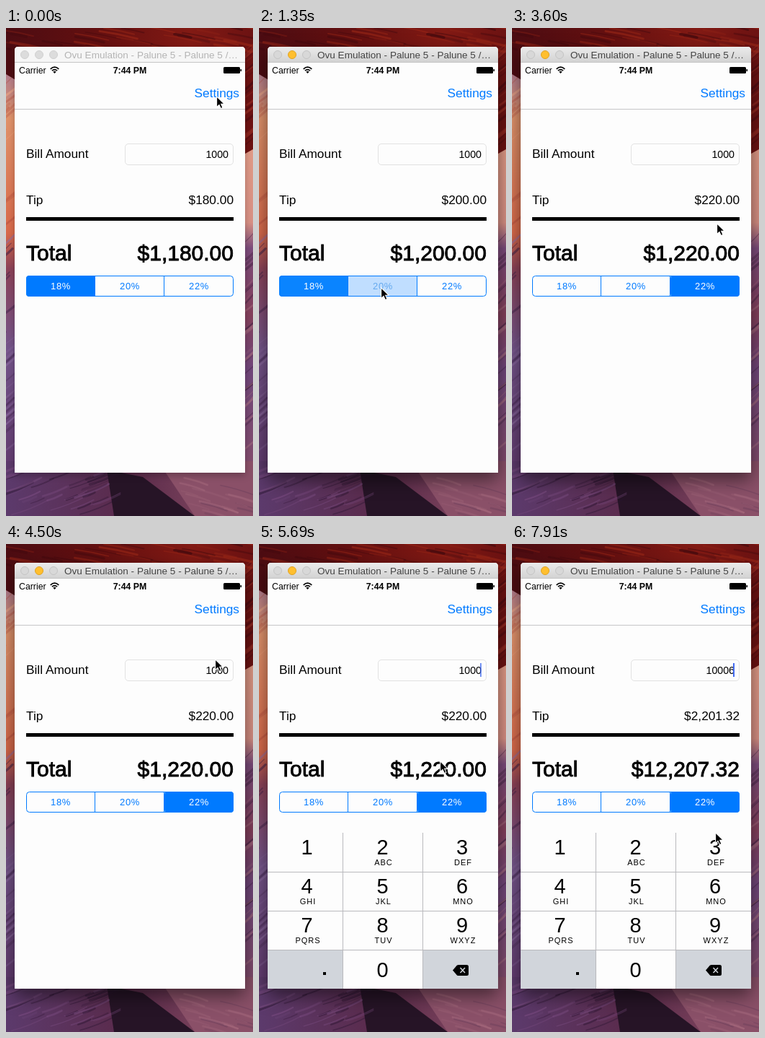
Recreate the animation shown at these times as an HTML page. Size 343 px wide and 676 px high, loop 8 s.

```html
<!DOCTYPE html>
<html lang="en">
<head>
<meta charset="utf-8">
<title>Tip calculator</title>
<style>
  html, body { margin: 0; width: 100%; height: 100%; overflow: hidden; }
  svg { display: block; width: 343px; height: 676px; font: 17.3px "Liberation Sans", Arial, sans-serif; }
  .end { text-anchor: end; }
  .mid { text-anchor: middle; }
  .blue { fill: #007aff; }
  .big { font-size: 30px; stroke: #000; stroke-width: .9px; }
  .small { font-size: 12.3px; }
  .segment { font-size: 13px; letter-spacing: .6px; }
  .digit { font-size: 29px; }
  .letters { font-size: 11px; letter-spacing: 1px; }
  #frame { filter: drop-shadow(0 4px 5px rgba(0, 0, 0, .25)); }
  .active #frame { filter: drop-shadow(0 10px 12px rgba(0, 0, 0, .5)); }
  #bar { fill: #f6f6f6; }
  .active #bar { fill: url(#barFill); }
  #title { font-size: 13.55px; fill: #b4b4b4; }
  .active #title { fill: #444; }
  .light { fill: #dcdcdc; stroke: #d0d0d0; }
  .active .light { fill: #d8d8d8; stroke: #c4c4c4; }
  .active .yellow { fill: #ffbf2f; stroke: #e0a323; }
</style>
</head>
<body>
<svg id="stage" viewBox="0 0 343 676">
  <defs>
    <linearGradient id="barFill" x2="0" y2="1">
      <stop stop-color="#ebebeb"/><stop offset="1" stop-color="#d3d3d3"/>
    </linearGradient>
    <linearGradient id="sky">
      <stop stop-color="#4c0c12"/><stop offset=".4" stop-color="#651010"/>
      <stop offset=".75" stop-color="#821a14"/><stop offset="1" stop-color="#6c1212"/>
    </linearGradient>
    <linearGradient id="leftRock" x2="0" y2="1">
      <stop stop-color="#b27c8c"/><stop offset=".1" stop-color="#e0926a"/>
      <stop offset=".36" stop-color="#d8694a"/><stop offset=".44" stop-color="#8c4258"/>
      <stop offset=".62" stop-color="#74548a"/><stop offset="1" stop-color="#5a3164"/>
    </linearGradient>
    <linearGradient id="rightRock" x2="0" y2="1">
      <stop stop-color="#e09a86"/><stop offset=".2" stop-color="#d89084"/>
      <stop offset=".27" stop-color="#7c4c7c"/><stop offset=".45" stop-color="#84405c"/>
      <stop offset=".6" stop-color="#70467a"/><stop offset="1" stop-color="#8c5066"/>
    </linearGradient>
    <linearGradient id="ground">
      <stop stop-color="#5c3a6c"/><stop offset=".5" stop-color="#5a2a4a"/>
      <stop offset="1" stop-color="#8c5066"/>
    </linearGradient>
    <clipPath id="screen"><path d="M12 48H332V616H12Z"/></clipPath>
  </defs>

  <rect width="343" height="676" fill="url(#sky)"/>
  <path d="M0 64L40 88V676H0Z" fill="url(#leftRock)"/>
  <path d="M300 192L343 168V676H300Z" fill="url(#rightRock)"/>
  <path d="M0 600H343V676H0Z" fill="url(#ground)"/>
  <path d="M215 606L343 600V676H262Z" fill="#8a5068"/>
  <path d="M140 612L190 622L262 676H150Z" fill="#261426"/>
  <g id="streaks" fill="none" stroke-linecap="round"></g>

  <path id="frame" d="M12 616V31Q12 26 17 26H327Q332 26 332 31V616Z" fill="#fdfdfd"/>
  <path id="bar" d="M12 47V31Q12 26 17 26H327Q332 26 332 31V47Z"/>
  <path d="M12 47.5H332" stroke="#c4c4c4"/>
  <circle class="light" cx="26" cy="37" r="5.5"/>
  <circle class="light yellow" cx="46" cy="37" r="5.5"/>
  <circle class="light" cx="66" cy="37" r="5.5"/>
  <text id="title" x="81" y="42">Ovu Emulation - Palune 5 - Palune 5 /…</text>

  <text class="small" x="18" y="63">Carrier</text>
  <path d="M61.7 56.8Q67.5 51.6 73.3 56.8M63.9 59.2Q67.5 56 71.1 59.2" fill="none" stroke="#000" stroke-width="1.7"/>
  <path d="M65.3 60.6Q67.5 58.8 69.7 60.6L67.5 63Z"/>
  <text class="small mid" x="172" y="63" font-weight="bold">7:44 PM</text>
  <rect x="302" y="54" width="23" height="9" rx="1.5"/>
  <path d="M325.5 57H327V60H325.5Z"/>
  <text class="end blue" x="324" y="96">Settings</text>
  <path d="M12 112.5H332" stroke="#c6c6c8"/>

  <text x="28" y="180">Bill Amount</text>
  <rect x="165.5" y="160.5" width="150" height="29" rx="4.5" fill="#fdfdfd" stroke="#e2e2e2"/>
  <text id="bill" class="end" x="309" y="180" font-size="14.2"></text>
  <rect id="caret" x="307" y="165" width="2" height="19" fill="#426bf2"/>
  <text x="28" y="244">Tip</text>
  <text id="tip" class="end" x="316" y="244"></text>
  <path d="M28 262H316V267H28Z"/>
  <text class="big" x="28" y="321.5">Total</text>
  <text id="total" class="end big" x="316" y="321.5"></text>
  <g id="segments"></g>
  <rect x="28.5" y="343.5" width="287" height="28" rx="4" fill="none" stroke="#007aff"/>
  <path d="M123.5 344V371M219.5 344V371" stroke="#007aff"/>

  <g clip-path="url(#screen)">
    <g id="keyboard">
      <path d="M12 400H332V616H12Z" fill="#fdfdfd"/>
      <path d="M12 562H116V616H12ZM228 562H332V616H228Z" fill="#d1d5db"/>
      <path d="M116.5 400V616M227.5 400V616M12 454.5H332M12 508.5H332M12 562.5H332" stroke="#b9b9bd"/>
      <g id="keys"></g>
      <path d="M89 593H93V597H89Z"/>
      <path d="M269 590.5L275 583.5Q276 583 277 583H288.5Q291 583 291 585.5V595.5Q291 598 288.5 598H277Q276 598 275 597.5Z"/>
      <path d="M279.5 587L286 594M286 587L279.5 594" stroke="#d1d5db" stroke-width="1.5"/>
    </g>
  </g>
  <path id="cursor" d="M.6 .9V15.6L4 12.4L6.3 17.5L8.9 16.4L6.7 11.4H11.3Z" stroke="#fff" stroke-width="1.1"/>
</svg>
<script>
const LOOP = 8000, STEP = 146;
const PRESS = 150, clicks = [1350, 2700];
const FOCUS = 5100, TYPED = 7470, BLINK = 930;
const KEYBOARD_HEIGHT = 216;

const $ = id => document.getElementById(id);
const clamp = v => Math.min(1, Math.max(0, v));
const money = n => "$" + n.toLocaleString("en-US", { minimumFractionDigits: 2, maximumFractionDigits: 2 });

// Progress from 0 to 1 that advances in whole screen updates
const stepped = (t, start, steps) => clamp((Math.floor((t - start) / STEP) + 1) / steps);

const pointerHome = [292, 94];
const moves = [
  { start: 450, steps: 5, via: [245, 530], to: [169, 359] },
  { start: 1800, steps: 4, via: [224, 354], to: [279, 356] },
  { start: 3600, steps: 4, via: [290, 163], to: [295, 139] },
  { start: 4350, steps: 3, via: [291, 152], to: [287, 172] },
  { start: 5540, steps: 5, via: [250, 345], to: [170, 456] },
  { start: 6290, steps: 7, via: [182, 476], to: [286, 477] },
  { start: 7910, steps: 1, via: [284, 440], to: [282, 399] }
];

function pointerAt(t) {
  let point = pointerHome;
  for (const { start, steps, via, to } of moves) {
    const p = stepped(t, start, steps), q = 1 - p;
    point = point.map((from, i) => q * q * from + 2 * p * q * via[i] + p * p * to[i]);
  }
  return point;
}

// Rock grain: seeded random strokes inside a box, all leaning the same way
let seed = 7;
const random = () => (seed = seed * 16807 % 2147483647) / 2147483647;

function grain(count, x, y, width, height, slope, colors) {
  let strokes = "";
  for (let i = 0; i < count; i++) {
    const x0 = x + random() * width, y0 = y + random() * height, run = 15 + random() * 40;
    const color = colors[Math.floor(random() * colors.length)];
    strokes += `<path d="M${x0} ${y0}q${run / 2} ${run * slope / 3} ${run} ${run * slope}"
      stroke="${color}" stroke-width="${1 + random() * 2.5}" opacity="${.2 + random() * .4}"/>`;
  }
  return strokes;
}

$("streaks").innerHTML =
  grain(35, -20, -5, 350, 32, .2, ["#3a080e", "#a02a18"]) +
  grain(22, 325, 30, 10, 140, -1, ["#4a0c12", "#a03428"]) +
  grain(14, -30, 90, 20, 200, -.8, ["#f4b08a", "#b04a3c"]) +
  grain(26, -30, 310, 20, 290, -.8, ["#3c2046", "#9070a4"]) +
  grain(26, 322, 300, 10, 300, -1, ["#402040", "#a87080"]) +
  grain(40, -20, 618, 150, 58, -.4, ["#2a1430", "#7a4c80"]) +
  grain(18, 240, 618, 90, 55, .3, ["#70405c", "#a4687c"]);

$("segments").innerHTML = ["18%", "20%", "22%"].map((label, i) =>
  `<rect x="${28 + 96 * i}" y="343" width="96" height="29" rx="${i === 1 ? 0 : 4}"/>
   <text class="segment mid" x="${76 + 96 * i}" y="362">${label}</text>`).join("");
const fills = $("segments").querySelectorAll("rect");
const labels = $("segments").querySelectorAll("text");

const columns = [66.5, 171.5, 282];
const keyLetters = ["", "ABC", "DEF", "GHI", "JKL", "MNO", "PQRS", "TUV", "WXYZ"];
$("keys").innerHTML = keyLetters.map((letters, i) => {
  const x = columns[i % 3], y = 430 + 54 * Math.floor(i / 3);
  return `<text class="digit mid" x="${x}" y="${y}">${i + 1}</text>
    <text class="letters mid" x="${x + 1.5}" y="${y + 15}">${letters}</text>`;
}).join("") + `<text class="digit mid" x="171.5" y="599.5">0</text>`;

function draw(t) {
  const chosen = clicks.filter(click => t >= click).length;
  const selected = clicks.filter(click => t >= click + PRESS).length;
  const pressing = chosen !== selected;
  const bill = t < TYPED ? 1000 : 10006, rate = .18 + .02 * chosen;

  $("stage").classList.toggle("active", chosen > 0);
  $("bill").textContent = bill;
  $("tip").textContent = money(bill * rate);
  $("total").textContent = money(bill * (1 + rate));
  fills.forEach((shape, i) => {
    const [fill, ink] = i === selected ? [pressing ? "#0a84ff" : "#007aff", "#fff"]
      : i === chosen ? ["#c0deff", "#64a9ee"] : ["#fdfdfd", "#007aff"];
    shape.setAttribute("fill", fill);
    labels[i].setAttribute("fill", ink);
  });

  const blink = (t - FOCUS) % BLINK / BLINK;
  $("caret").setAttribute("opacity", t < FOCUS ? 0 : clamp((.78 - blink) * 5));
  const hidden = (1 - stepped(t, FOCUS, 3)) ** 1.65;
  $("keyboard").setAttribute("transform", `translate(0 ${Math.round(KEYBOARD_HEIGHT * hidden)})`);
  $("cursor").setAttribute("transform", `translate(${pointerAt(t).map(Math.round)})`);
}

const start = performance.now();
function tick() {
  draw((performance.now() - start) % LOOP);
  requestAnimationFrame(tick);
}
tick();
</script>
</body>
</html>
```
